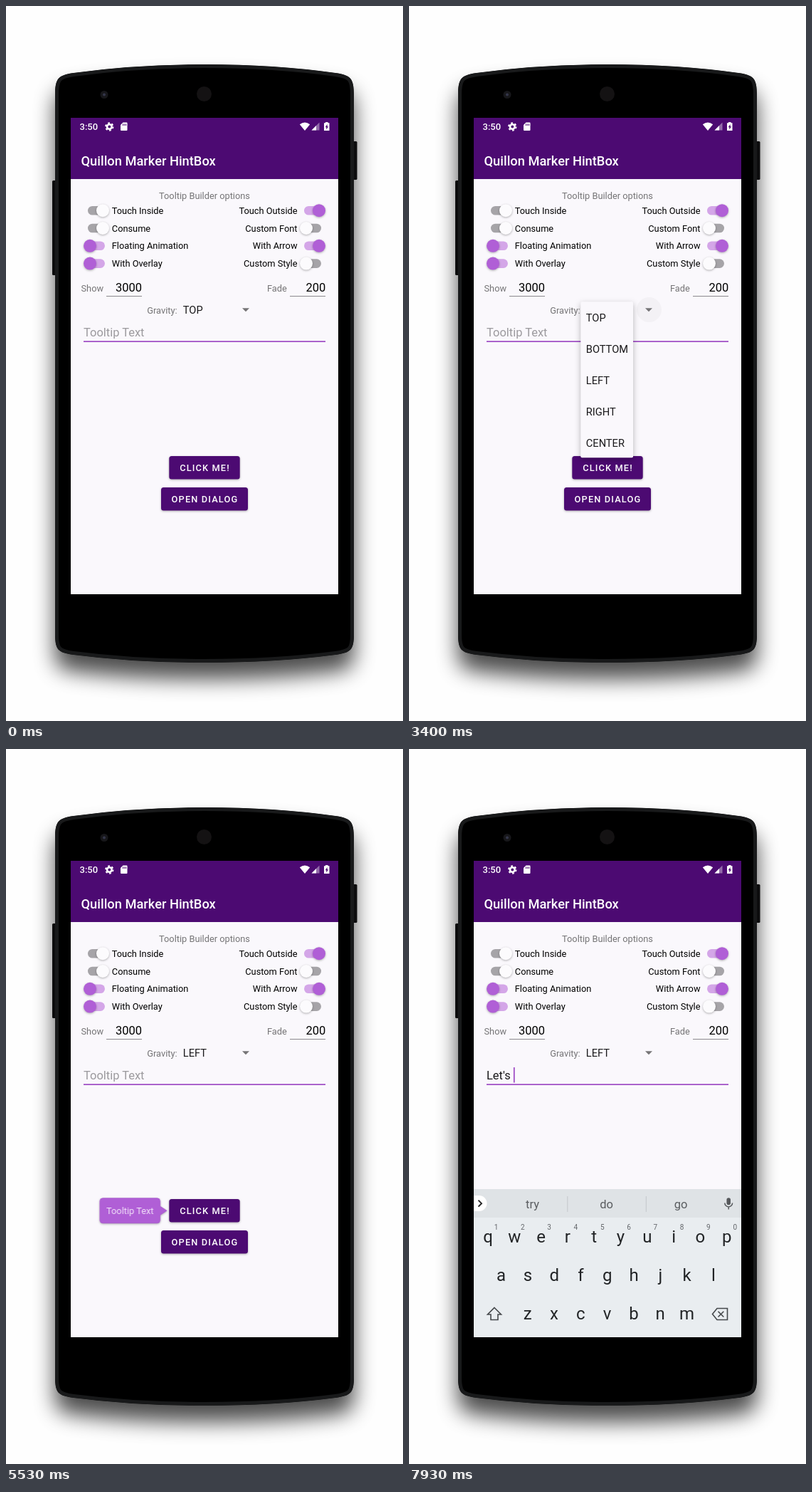
An HTML page that plays this animation: 558 px wide and 1004 px high, repeating every 8000 ms.

```html
<!DOCTYPE html>
<html lang="en">
<head>
<meta charset="utf-8">
<title>Tooltip options demo</title>
<style>
html, body { margin: 0; width: 100%; height: 100%; overflow: hidden; background: #fefefe; }
svg { display: block; width: 558px; height: 1004px; font-family: Roboto, "Noto Sans", sans-serif; font-size: 12.8px; }
.mid { text-anchor: middle; }
.end { text-anchor: end; }
.grey { fill: #757476; }
.big { font-size: 16.47px; }
.item { font-size: 14.64px; fill: #19181a; }
.cap { font-weight: 500; letter-spacing: 1.14px; fill: #fff; }
.lift { filter: drop-shadow(0 1.5px 1.5px rgba(0,0,0,.3)); }

.loop { animation: 8s linear infinite; }
.step { animation: 8s step-end infinite; }

/* 1% of the loop is 80 ms */
#topTip { animation-name: topTip; }
#leftTip { animation-name: leftTip; }
#pulse { animation-name: pulse; transform-box: fill-box; transform-origin: center; }
#menu { animation-name: menu; }
#halo { animation-name: halo; }
#wasTop { animation-name: wasTop; }
#isLeft { animation-name: isLeft; }
#hint { animation-name: hint; }
#typed { animation-name: typed; transform-box: fill-box; }
#caret { animation-name: caret; }
#keys { animation-name: keys; }
#prompt { animation-name: hint; }
#words { animation-name: words; }
.bob { animation: .4s cubic-bezier(.37,0,.63,1) infinite alternate; }
.bob.y { animation-name: bobY; animation-delay: -316ms; }
.bob.x { animation-name: bobX; animation-delay: -371ms; }

@keyframes bobY { from { transform: translateY(-2.8px); } to { transform: translateY(2.8px); } }
@keyframes bobX { from { transform: translateX(-2.8px); } to { transform: translateX(2.8px); } }
@keyframes topTip { 0%, 3.5% { opacity: 0; } 6%, 32.6% { opacity: 1; } 35.5%, 100% { opacity: 0; } }
@keyframes leftTip { 0%, 56.6% { opacity: 0; } 59%, 70% { opacity: 1; } 72.5%, 100% { opacity: 0; } }
@keyframes pulse {
  0%, .8% { transform: scale(0); opacity: .3; }
  2.8%, 6% { transform: scale(1); opacity: .49; }
  10%, 10.01% { transform: scale(1); opacity: 0; }
  10.02%, 16.3% { transform: scale(0); opacity: .3; }
  18.2%, 21.4% { transform: scale(1); opacity: .49; }
  25.5%, 25.51% { transform: scale(1); opacity: 0; }
  25.52%, 31.7% { transform: scale(0); opacity: .35; }
  32.5% { transform: scale(.135); opacity: .36; }
  33.4% { transform: scale(.2); opacity: .25; }
  34.1%, 34.11% { transform: scale(.2); opacity: 0; }
  34.12%, 56.6% { transform: scale(0); opacity: .3; }
  58.8%, 62% { transform: scale(1); opacity: .49; }
  66%, 100% { transform: scale(1); opacity: 0; }
}
@keyframes menu {
  0%, 36% { opacity: 0; transform: translateY(-8px); }
  39%, 48.4% { opacity: 1; transform: none; }
  50.9%, 100% { opacity: 0; transform: none; }
}
@keyframes halo { 0%, 33.8% { opacity: 0; } 36%, 48% { opacity: 1; } 50.9%, 100% { opacity: 0; } }
@keyframes wasTop { 0% { opacity: 1; } 48.4%, 100% { opacity: 0; } }
@keyframes isLeft { 0% { opacity: 0; } 48.4%, 100% { opacity: 1; } }
@keyframes hint { 0% { opacity: 1; } 89.1%, 100% { opacity: 0; } }
@keyframes words { 0% { opacity: 0; } 97.4%, 100% { opacity: 1; } }
@keyframes typed {
  0% { opacity: 0; clip-path: inset(-4px 74% -4px -2px); }
  89.1% { opacity: 1; clip-path: inset(-4px 74% -4px -2px); }
  91.6% { opacity: 1; clip-path: inset(-4px 49% -4px -2px); }
  93.3% { opacity: 1; clip-path: inset(-4px 33% -4px -2px); }
  95.8%, 100% { opacity: 1; clip-path: inset(-4px -2px -4px -2px); }
}
@keyframes caret {
  0% { opacity: 0; transform: none; }
  75% { opacity: 1; transform: none; }
  81.2% { opacity: 0; transform: none; }
  87.5% { opacity: 1; transform: none; }
  89.1% { opacity: 1; transform: translateX(9px); }
  91.6% { opacity: 1; transform: translateX(17.6px); }
  93.3% { opacity: 1; transform: translateX(23px); }
  95.8% { opacity: 1; transform: translateX(34.4px); }
  97.4%, 100% { opacity: 1; transform: translateX(38px); }
}
@keyframes keys {
  0%, 75.8% { opacity: 0; transform: translateY(62px); }
  77.5% { opacity: .68; transform: translateY(28px); }
  78.7% { opacity: .9; transform: translateY(10px); }
  80.5%, 100% { opacity: 1; transform: none; }
}
</style>
</head>
<body>
<svg viewBox="0 0 558 1004">
  <defs>
    <path id="body" d="M69 125C69 102 73 97 95 94Q180 82 279 82T463 94C485 97 489 102 489 125V882C489 904 485 908 463 911Q378 922 279 922T95 911C73 908 69 904 69 882Z"/>
    <clipPath id="bodyClip"><use href="#body"/></clipPath>
    <clipPath id="screen"><path d="M91 157H467V826H91Z"/></clipPath>
    <clipPath id="btnClip"><rect x="229.3" y="632" width="99.4" height="32.5" rx="3.5"/></clipPath>
    <filter id="soft" x="-20%" y="-10%" width="140%" height="125%"><feGaussianBlur stdDeviation="15"/></filter>
  </defs>

  <!-- phone -->
  <use href="#body" y="23" opacity=".7" filter="url(#soft)"/>
  <rect x="65" y="245" width="8" height="133" rx="1.5" fill="#0c0c0d"/>
  <rect x="485" y="190" width="8.5" height="54" rx="1.5" fill="#0c0c0d"/>
  <use href="#body" stroke="#18191a" stroke-width="10" clip-path="url(#bodyClip)"/>
  <circle cx="138" cy="124.5" r="5.5" fill="#17171a"/>
  <circle cx="138" cy="124.5" r="2" fill="#34364a"/>
  <circle cx="278.5" cy="123.5" r="10.5" fill="#141213"/>

  <g clip-path="url(#screen)">
    <path d="M91 157H467V826H91Z" fill="#faf8fc"/>
    <path d="M91 157H467V243H91Z" fill="#4c0a72"/>

    <!-- status and title bars -->
    <g fill="#fff">
      <text x="103.5" y="174.3" font-size="13" font-weight="500">3:50</text>
      <circle cx="145.3" cy="169.5" r="3.3" fill="none" stroke="#fff" stroke-width="2.6"/>
      <circle cx="145.3" cy="169.5" r="5.2" fill="none" stroke="#fff" stroke-width="2" stroke-dasharray="2.72"/>
      <path d="M164.5 163.5H169.5Q170.5 163.5 170.5 164.5V174Q170.5 175 169.5 175H162Q161 175 161 174V167ZM164 165.5V168H165V165.5ZM166 165.5V168H167V165.5ZM168 165.5V168H169V165.5Z" fill-rule="evenodd"/>
      <path d="M412.8 166.2Q420 160.6 427.2 166.2L420 175Z"/>
      <path d="M440.5 163.5V174.5H429.5Z" opacity=".4"/>
      <path d="M436 168V174.5H429.5Z"/>
      <path d="M449 163H452.500V164.200H454.500V175H447V164.200H449ZM451.600 166L448.700 170.200H450.300V173.400L453 169.200H451.600Z" fill-rule="evenodd"/>
      <text x="105.5" y="224" font-size="18.3" font-weight="500">Quillon Marker HintBox</text>
    </g>

    <!-- options -->
    <text class="mid grey" x="279" y="271.2">Tooltip Builder options</text>
    <g id="switches"></g>
    <text class="grey" x="105.500" y="400.500">Show</text>
    <text class="end big" x="191" y="401">3000</text>
    <text class="grey" x="367" y="400.500">Fade</text>
    <text class="end big" x="449.300" y="401">200</text>
    <path d="M141 407.500H191M399 407.500H449" stroke="#8b898d"/>
    <text class="grey" x="198.300" y="431.700">Gravity:</text>
    <text class="item step" id="wasTop" x="248.800" y="432.200">TOP</text>
    <text class="item step" id="isLeft" x="248.800" y="432.200">LEFT</text>
    <circle class="loop" id="halo" cx="337.500" cy="426.500" r="17.500" fill="#f3f1f5"/>
    <path d="M332 424.300H342L337 429.300Z" fill="#757476"/>
    <text class="big step" id="hint" x="109" y="464" fill="#9c9a9e">Tooltip Text</text>
    <text class="big step" id="typed" x="109" y="464" fill="#19181a">Let's</text>
    <path d="M109 471.200H449" stroke="#a04fc6" stroke-width="1.800"/>
    <path class="step" id="caret" d="M109.800 447V468.500" stroke="#a04fc6" stroke-width="1.800"/>

    <!-- buttons -->
    <g class="lift" fill="#4c0a72">
      <rect x="229.300" y="632" width="99.400" height="32.500" rx="3.500"/>
      <rect x="218" y="676" width="122" height="32.500" rx="3.500"/>
    </g>
    <text class="cap mid" x="279.500" y="653">CLICK ME!</text>
    <text class="cap mid" x="279.500" y="697">OPEN DIALOG</text>
    <g clip-path="url(#btnClip)"><circle class="loop" id="pulse" cx="279" cy="648.300" r="53" fill="#fff"/></g>

    <!-- tooltips -->
    <g class="loop" id="topTip"><g class="bob y">
      <path class="lift" d="M240.500 579.300H317.500Q321.500 579.300 321.500 583.300V610.300Q321.500 614.300 317.500 614.300H285.500L279 623.500L272.500 614.300H240.500Q236.500 614.300 236.500 610.300V583.300Q236.500 579.300 240.500 579.300Z" fill="#b05fd6" stroke="#a653ce" stroke-width=".8"/>
      <text class="mid" x="279" y="602" fill="#f3e4fa">Tooltip Text</text>
    </g></g>
    <g class="loop" id="leftTip"><g class="bob x">
      <path class="lift" d="M134 630.800H210.500Q214.500 630.800 214.500 634.800V642L224 648.300L214.500 654.600V661.800Q214.500 665.800 210.500 665.800H134Q130 665.800 130 661.800V634.800Q130 630.800 134 630.800Z" fill="#b05fd6" stroke="#a653ce" stroke-width=".8"/>
      <text class="mid" x="172.300" y="653.300" fill="#f3e4fa">Tooltip Text</text>
    </g></g>

    <!-- gravity list -->
    <g class="loop" id="menu">
      <rect x="241.300" y="415.300" width="73.700" height="219" rx="1.800" fill="#faf8fc" style="filter:drop-shadow(0 3px 4px rgba(0,0,0,.28))"/>
      <g id="choices"></g>
    </g>

    <!-- keyboard -->
    <g class="loop" id="keys">
      <path d="M91 618H467V900H91Z" fill="#e9edf0"/>
      <path d="M91 618H467V658H91Z" fill="#dfe3e6"/>
      <path d="M91 627H98.500A11 11 0 0 1 98.500 649H91Z" fill="#fff"/>
      <path d="M97.500 633.700L102 638.200L97.500 642.700" fill="none" stroke="#222" stroke-width="1.900"/>
      <g fill="none" stroke="#55585b" stroke-width="1.500">
        <rect x="447.200" y="631" width="4" height="8.500" rx="2" fill="#55585b"/>
        <path d="M443.800 637.500A5.400 5.400 0 0 0 454.600 637.500M449.200 643V646.500"/>
      </g>
      <text class="mid step" id="prompt" x="278" y="644" font-size="14.500" fill="#4d988e">Suggest contacts? Tap for info.</text>
      <g class="mid step" id="words" font-size="16.500" fill="#5a5d60">
        <text x="173.500" y="644.500">try</text>
        <text x="277.500" y="644.500">do</text>
        <text x="382" y="644.500">go</text>
        <path d="M222.800 628V650M333.300 628V650" stroke="#c3c7ca"/>
      </g>
      <g class="mid" id="letters" font-size="24" fill="#222426"></g>
      <g fill="none" stroke="#45484b" stroke-width="1.600">
        <path d="M120 784.500L129.500 794H125V801.500H115V794H110.500Z"/>
        <path d="M433 785.500H447.500V801.500H433L426.500 793.500ZM434.500 789.700L442.300 797.500M442.300 789.700L434.500 797.500"/>
      </g>
    </g>
  </g>
</svg>
<script>
const fill = (id, parts) => { document.getElementById(id).innerHTML = parts.join(''); };

const toggle = (label, row, right, on) => {
  const y = 287.2 + row * 24.8;
  const track = right ? (on ? 419 : 415) : (on ? 111 : 115);
  const thumb = right === on ? track + 21 : track + 7;
  return `<rect x="${track}" y="${y - 6.3}" width="28" height="12.6" rx="6.3" fill="${on ? '#d4a6e8' : '#a6a4a8'}"/>
    <circle class="lift" cx="${thumb}" cy="${y}" r="9" fill="${on ? '#b05fd6' : '#fcfbfd'}"/>
    <text x="${right ? 409.5 : 148.8}" y="${y + 4.6}" ${right ? 'class="end"' : ''}>${label}</text>`;
};
fill('switches', [
  toggle('Touch Inside', 0, false, false), toggle('Touch Outside', 0, true, true),
  toggle('Consume', 1, false, false), toggle('Custom Font', 1, true, false),
  toggle('Floating Animation', 2, false, true), toggle('With Arrow', 2, true, true),
  toggle('With Overlay', 3, false, true), toggle('Custom Style', 3, true, false)
]);

fill('choices', ['TOP', 'BOTTOM', 'LEFT', 'RIGHT', 'CENTER'].map((name, i) =>
  `<text class="item" x="248.8" y="${443.2 + i * 43.9}">${name}</text>`));

const rows = [['qwertyuiop', 111], ['asdfghjkl', 129.6], ['zxcvbnm', 166.7]];
const letters = rows.flatMap(([row, x], r) => [...row].map((key, i) =>
  `<text x="${x + i * 37.3}" y="${693 + r * 54}">${key}</text>`));
const digits = [...'1234567890'].map((d, i) =>
  `<text x="${122.5 + i * 37.3}" y="675.3" font-size="10" fill="#63666a">${d}</text>`);
fill('letters', letters.concat(digits));
</script>
</body>
</html>
```
